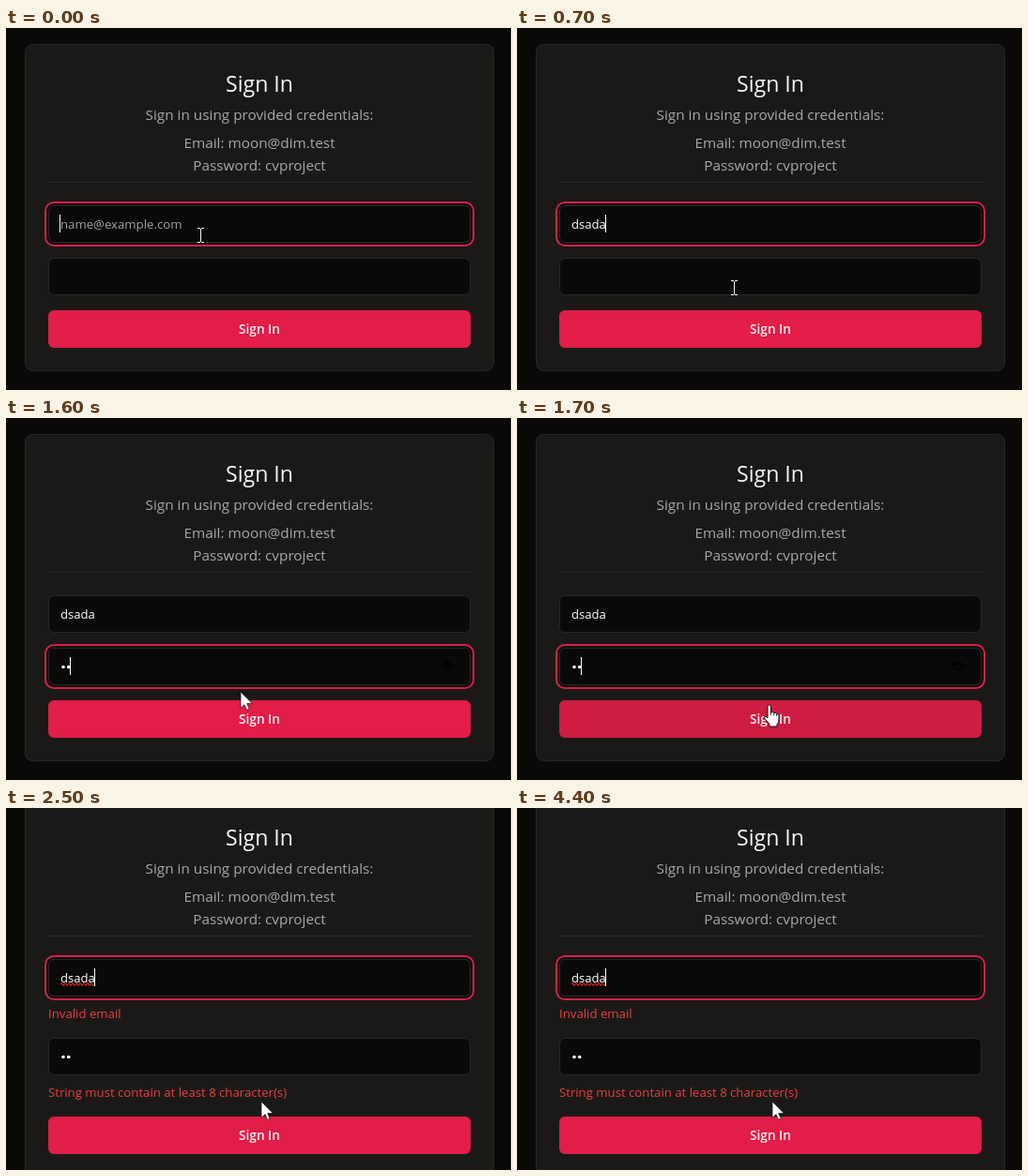
These frames come from a looping animation (538 px wide and 386 px high, 4.7 s). An HTML page:

```html
<!DOCTYPE html>
<html lang="en">
<head>
<meta charset="utf-8">
<title>Sign In</title>
<style>
  html, body { margin: 0; width: 100%; height: 100%; overflow: hidden; background: #0a0908; }
  svg { display: block; font: 13.2px "Open Sans", "Noto Sans", sans-serif; }
  .panel { fill: #1b1917; stroke: #272728; }
  .input { fill: #0b0908; stroke: #272728; }
  .title { font-size: 23.1px; font-weight: 500; fill: #fafafa; }
  .muted { font-size: 15.3px; fill: #a8a8ae; }
  .middle { text-anchor: middle; }
  .button { fill: #e11d48; }
  .label { font-size: 13.6px; font-weight: 600; fill: #fff1f2; }
  .value { font-size: 13.1px; font-weight: 500; fill: #fff; }
  .error { fill: #ea4042; }
  .line { fill: none; }
</style>
</head>
<body>
<svg width="538" height="386" viewBox="0 0 538 386">
  <rect id="card" class="panel" x="20.5" width="499" rx="8"/>

  <g id="head">
    <g class="middle">
      <text class="title" x="270" y="68">Sign In</text>
      <text class="muted" x="270" y="98">Sign in using provided credentials:</text>
      <text class="muted" x="270" y="128">Email: moon@dim.test</text>
      <text class="muted" x="270" y="152">Password: cvproject</text>
    </g>
    <path d="M45 164.5H496" stroke="#292729"/>
    <rect class="input" x="45.5" y="189.5" width="449" height="39" rx="6"/>
    <text id="placeholder" x="58" y="214" fill="#a1a1aa">name@example.com</text>
    <text id="email" class="value" x="58" y="214"></text>
  </g>

  <rect class="input" x="45.5" y="245.5" width="449" height="39" rx="6"/>
  <g id="dots" fill="#fff">
    <circle cx="61" cy="265.5" r="1.8"/>
    <circle cx="66.7" cy="265.5" r="1.8"/>
  </g>
  <g id="eye" class="line" stroke="#000" stroke-width="1.3">
    <path d="M463 265Q470 256 477 265"/>
    <circle cx="470" cy="266" r="3"/>
  </g>

  <g id="errors" class="error">
    <path id="squiggle" class="line" stroke="#d3232f" stroke-width="1.2"/>
    <text x="45" y="224">Invalid email</text>
    <text x="45" y="308">String must contain at least 8 character(s)</text>
  </g>

  <g id="foot">
    <rect id="button" class="button" x="45" y="301" width="450" height="40" rx="6"/>
    <text class="label middle" x="270" y="326">Sign In</text>
  </g>

  <g id="ring" class="line" stroke-width="2">
    <rect x="44" y="-1" width="452" height="42" rx="7" stroke="#0c0a09"/>
    <rect x="42" y="-3" width="456" height="46" rx="9" stroke="#d42049"/>
  </g>
  <rect id="caret" width="1" height="19" fill="#fff"/>

  <g id="mouse">
    <path id="beam" class="line" stroke="#f4f4f4" d="M-3 -7.5H0M1 -7.5H4M.5 -7V7M-3 7.5H0M1 7.5H4"/>
    <path id="arrow" fill="#fff" stroke="#111" stroke-width=".7"
      d="M0 0V17.3L4 13.7L6.6 19.4L9.2 18.2L6.7 12.6H12.3Z"/>
    <g id="hand" fill="#fff" stroke="#111" stroke-linejoin="round">
      <path d="M-2 1Q-2 -1 -.3 -1T1.5 1V7Q3.2 5.6 4.6 7.5Q6.4 6.4 7.5 8.4Q10 7.8 10 10.5V15
               Q10 18 8 19.5V22H0V19.5L-5.4 13Q-6 10.5 -4 11L-2 13Z"/>
      <path d="M1.5 7V10M4.6 7.5V10.5M7.5 8.4V11" stroke-width=".8"/>
    </g>
  </g>
</svg>
<script>
const $ = id => document.getElementById(id);
const LOOP = 4700, STEP = 100, ERROR_AT = 2500, SHIFT = 28;

// time, x, y of the pointer's hot spot
const route = [[0, 207, 221], [600, 231, 277], [1500, 231, 277], [1700, 269, 307], [1900, 272, 313]];

const show = (id, on) => $(id).style.display = on ? "" : "none";
const move = (id, x, y) => $(id).setAttribute("transform", `translate(${x} ${y})`);
const set = (id, name, value) => $(id).setAttribute(name, value);

function pointerAt(t) {
  const next = route.findIndex(point => point[0] > t);
  if (next < 0) return route.at(-1).slice(1);
  const [t0, x0, y0] = route[next - 1], [t1, x1, y1] = route[next];
  const k = (t - t0) / (t1 - t0);
  return [Math.round(x0 + (x1 - x0) * k), Math.round(y0 + (y1 - y0) * k)];
}

function draw(t) {
  const failed = t >= ERROR_AT;
  const shift = failed ? SHIFT : 0;
  const focus = t < 900 || failed ? "email" : t < 2000 ? "password" : "";
  const typed = t < 600 ? "" : t < 700 ? "d" : "dsada";
  const hasPassword = t >= 1600;

  set("card", "y", 17.5 - shift);
  set("card", "height", 348 + 2 * shift);
  move("head", 0, -shift);
  move("foot", 0, shift);
  show("errors", failed);

  $("email").textContent = typed;
  show("placeholder", !typed);
  show("dots", hasPassword);
  show("eye", hasPassword && focus === "password");

  const fieldY = focus === "email" ? 189 - shift : 245;
  const textWidth = focus === "email" ? $("email").getComputedTextLength() : hasPassword ? 11 : 0;
  const blinkedOff = t >= 2900 && t < 3700 || t >= 4000 && t < 4400;
  show("ring", focus);
  move("ring", 0, fieldY);
  show("caret", focus && !blinkedOff);
  move("caret", Math.floor(58 + textWidth - 0.5), fieldY + 10);

  const [x, y] = pointerAt(t);
  const overButton = !failed && y >= 301;
  const overInput = y >= 189 && y < 229 || y >= 245 && y < 285;
  move("mouse", x, y);
  show("hand", overButton);
  show("beam", overInput);
  show("arrow", !overButton && !overInput);
  set("button", "fill-opacity", overButton ? 0.9 : 1);
}

let wave = "M58 188";
for (let i = 0; i < 9; i++) wave += "q1 -2.4 2 0t2 0";
set("squiggle", "d", wave);

function frame() {
  const t = performance.now() % LOOP;
  draw(Math.floor(t / STEP) * STEP);
  requestAnimationFrame(frame);
}
frame();
</script>
</body>
</html>
```
